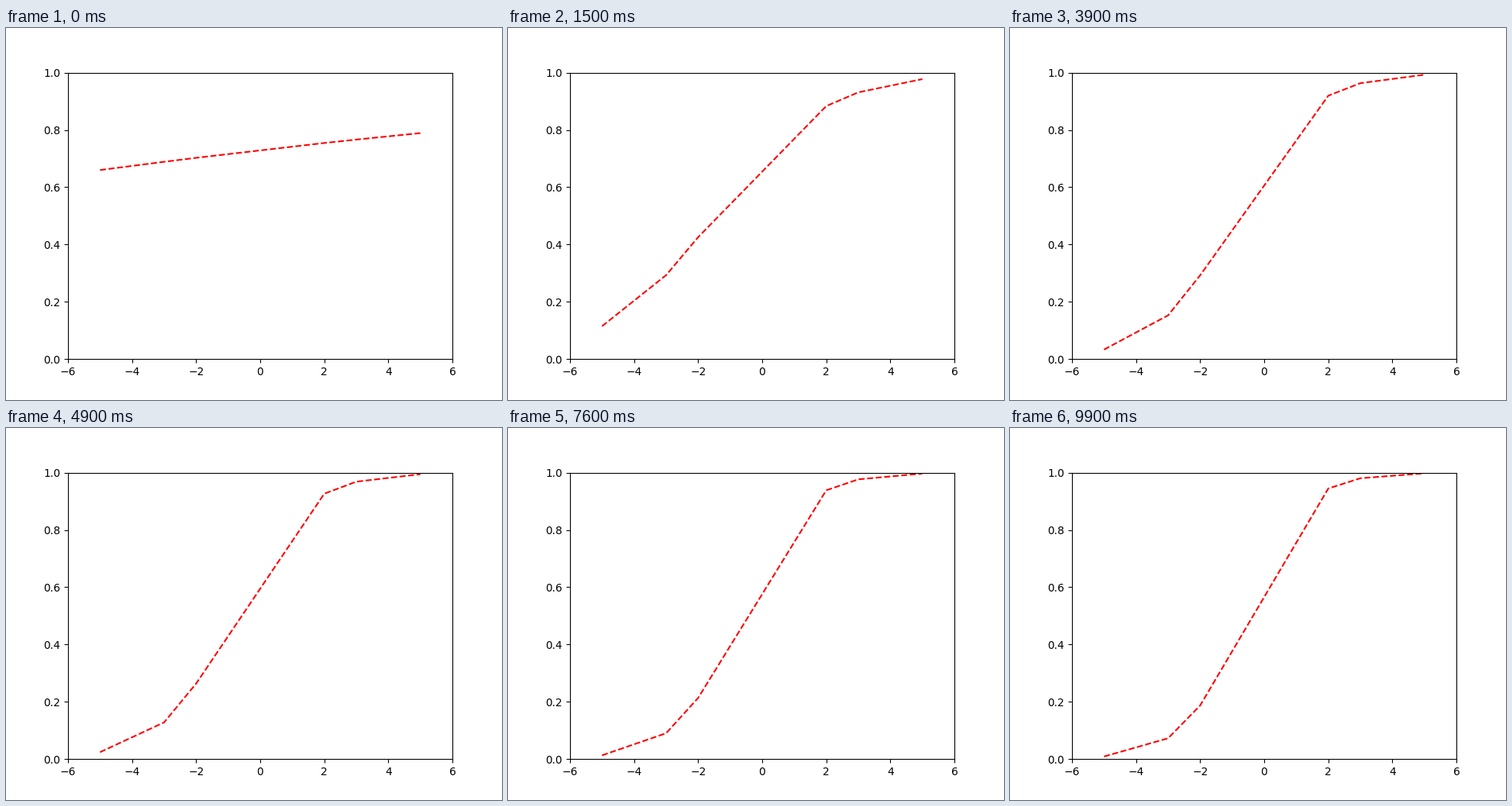
These frames come from a looping animation (640 px wide and 480 px high, 10 s). A matplotlib script:

```python
import numpy as np
import matplotlib.pyplot as plt
from matplotlib.animation import FuncAnimation

FRAMES, INTERVAL = 100, 100
RATE = 0.1

x = np.array([-5.0, -3.0, -2.0, 2.0, 3.0, 5.0])
labels = (x > 0).astype(float)


def sigmoid(z):
    return 1 / (1 + np.exp(-z))


def train(steps, w=0.0, b=1.0):
    """Fit a sigmoid by gradient descent on the mean squared error."""
    curves = []
    for _ in range(steps):
        p = sigmoid(w * x + b)
        slope = 2 * (p - labels) * p * (1 - p)
        w -= RATE * np.mean(slope * x)
        b -= RATE * np.mean(slope)
        curves.append(sigmoid(w * x + b))
    return curves


curves = train(FRAMES)

fig, ax = plt.subplots(figsize=(6.4, 4.8), dpi=100)
ax.set_xlim(-6, 6)
ax.set_ylim(0, 1)
line, = ax.plot(x, curves[0], "r--")


def update(i):
    line.set_ydata(curves[i])
    return line,


anim = FuncAnimation(fig, update, frames=FRAMES, interval=INTERVAL,
                     repeat=True, repeat_delay=0)
plt.show()
```
